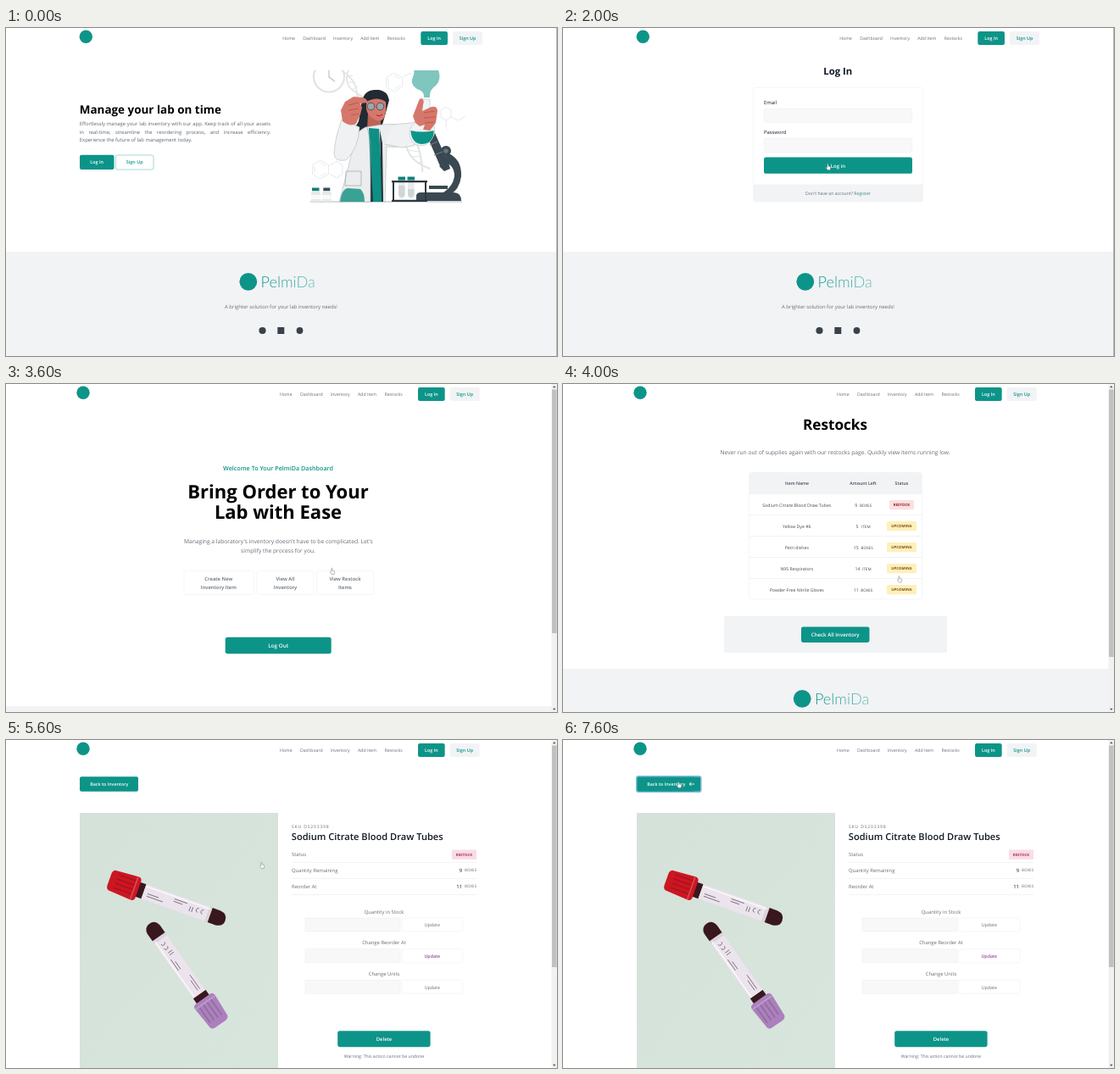
Animation of 650 by 387 pixels, one loop 8000 ms. Source, as an HTML page:

```html
<!DOCTYPE html>
<html lang="en">
<head>
<meta charset="utf-8">
<title>Lab inventory demo</title>
<style>
html, body { margin: 0; width: 100%; height: 100%; overflow: hidden; background: #fff; }
svg { display: block; width: 650px; height: 387px; }
text, .para {
  font-family: "Open Sans", "Noto Sans", sans-serif;
  text-rendering: geometricPrecision;
}
text { fill: #666d77; }
.para { font-size: 5.9px; line-height: 9.4px; color: #5f6670; white-space: nowrap; }
.para div:first-child { text-align: justify; text-align-last: justify; white-space: normal; }
.c { text-anchor: middle; }
.m { font-weight: 600; }
.b { font-weight: 700; fill: #000; }
.d { fill: #111827; }
.w { font-weight: 600; fill: #fff; }
.t { fill: #0d9488; }
.cell text { fill: #414853; font-size: 5.2px; }
.cell .u, .u { font-size: 4.6px; }
.cell .red { fill: #8f1f2f; font-size: 4.4px; font-weight: 700; }
.amber { fill: #80511a; font-size: 4.35px; font-weight: 700; }
.word { font: 300 18.2px Lato, sans-serif; fill: url(#fade); }
.btn { fill: #0d9488; }
.pale { fill: #f1f3f5; }
.box { fill: #fff; stroke: #f0f2f4; stroke-width: .7; }
.field { fill: #f8f8f9; stroke: #eceef0; stroke-width: .6; }
.rule { stroke: #eceef0; stroke-width: .7; fill: none; }
.ring { fill: none; stroke: #7fb9e2; stroke-width: 1.4; }
.thumb { fill: #c1c1c1; }

/* one loop: 1% = 80 ms */
.page, .on, #cursor { animation: 8s step-end infinite; }
#home { animation-name: home; }
#login { animation-name: login; }
#dash { animation-name: dash; }
#stock { animation-name: stock; }
#item { animation-name: item; }
#bar { animation-name: bar; }
#edge { animation-name: edge; }
#ring1 { animation-name: ring1; }
#ring2 { animation-name: ring2; }
#over1 { animation-name: over1; }
#under { animation-name: under; }
#over2 { animation-name: over2; }
#cursor { animation-name: move; }
#arrow { animation-name: arrow; }
#hand { animation-name: hand; }
#busy { animation-name: busy; }
@keyframes home { 0% { opacity: 1 } 15%, 100% { opacity: 0 } }
@keyframes login { 0% { opacity: 0 } 15% { opacity: 1 } 32.5%, 100% { opacity: 0 } }
@keyframes dash { 0% { opacity: 0 } 32.5% { opacity: 1 } 50%, 100% { opacity: 0 } }
@keyframes stock { 0% { opacity: 0 } 50% { opacity: 1 } 70%, 100% { opacity: 0 } }
@keyframes item { 0% { opacity: 0 } 70%, 100% { opacity: 1 } }
@keyframes bar { 0% { opacity: 0 } 32.5%, 100% { opacity: 1 } }
@keyframes edge { 0% { opacity: 1 } 32.5%, 100% { opacity: 0 } }
@keyframes ring1 { 0% { opacity: 0 } 8.75%, 100% { opacity: 1 } }
@keyframes ring2 { 0% { opacity: 0 } 26.25%, 100% { opacity: 1 } }
@keyframes over1 { 0% { opacity: 0 } 46.25%, 100% { opacity: 1 } }
@keyframes under { 0% { opacity: 0 } 62.5%, 100% { opacity: 1 } }
@keyframes over2 { 0% { opacity: 0 } 92.5%, 100% { opacity: 1 } }
@keyframes arrow {
  0% { opacity: 0 } 6.25% { opacity: 1 } 7.5% { opacity: 0 }
  16.25% { opacity: 1 } 21.25% { opacity: 0 } 38.75% { opacity: 1 } 43.75% { opacity: 0 }
  52.5% { opacity: 1 } 62.5% { opacity: 0 } 76.25% { opacity: 1 } 95%, 100% { opacity: 0 }
}
@keyframes hand {
  0% { opacity: 0 } 7.5% { opacity: 1 } 16.25% { opacity: 0 }
  21.25% { opacity: 1 } 32.5% { opacity: 0 } 43.75% { opacity: 1 } 52.5% { opacity: 0 }
  62.5% { opacity: 1 } 76.25% { opacity: 0 } 95%, 100% { opacity: 1 }
}
@keyframes busy { 0% { opacity: 0 } 32.5% { opacity: 1 } 38.75%, 100% { opacity: 0 } }
@keyframes move {
  0% { transform: translate(216px, 147px) }
  6.25% { transform: translate(216px, 147px); animation-timing-function: steps(3, start) }
  10% { transform: translate(102px, 157px) }
  16.25% { transform: translate(102px, 157px); animation-timing-function: steps(8, start) }
  26.25% { transform: translate(313px, 164px) }
  38.75% { transform: translate(313px, 164px); animation-timing-function: steps(7, start) }
  47.5% { transform: translate(397px, 230.5px) }
  52.5% { transform: translate(397px, 230.5px); animation-timing-function: steps(4, start) }
  57.5% { transform: translate(392px, 159px) }
  58.75% { transform: translate(402px, 145px); animation-timing-function: steps(5, start) }
  65% { transform: translate(302px, 148px) }
  76.25% { transform: translate(302px, 148px); animation-timing-function: steps(4, start) }
  81.25% { transform: translate(533px, 206px); animation-timing-function: steps(5, start) }
  87.5% { transform: translate(283px, 95px); animation-timing-function: steps(5, start) }
  93.75%, 100% { transform: translate(137px, 53px) }
}
</style>
</head>
<body>
<svg viewBox="0 0 650 387">
<defs>
  <linearGradient id="fade"><stop offset="0" stop-color="#0d9488"/><stop offset="1" stop-color="#6cc0b8"/></linearGradient>
  <linearGradient id="mint" x2="1" y2="1"><stop offset="0" stop-color="#d4e2d9"/><stop offset="1" stop-color="#d8e5dd"/></linearGradient>
  <clipPath id="photo"><rect x="87" y="86" width="234" height="301"/></clipPath>
  <clipPath id="scene"><rect x="355" y="50" width="190" height="156"/></clipPath>

  <g id="nav">
    <circle cx="94.3" cy="10.3" r="7.7" class="btn"/>
    <g font-size="5.2">
      <text x="326.2" y="14.4">Home</text><text x="350.2" y="14.4">Dashboard</text>
      <text x="386" y="14.4">Inventory</text><text x="418.3" y="14.4">Add Item</text>
      <text x="449.8" y="14.4">Restocks</text>
    </g>
    <rect x="489.3" y="4" width="31.7" height="16" rx="2.2" class="btn"/>
    <text x="505.2" y="14.3" font-size="5.4" class="c w">Log In</text>
    <rect x="527" y="4" width="35" height="16" rx="2.2" class="pale"/>
    <text x="544.5" y="14.3" font-size="5.4" class="c m t">Sign Up</text>
  </g>

  <g id="foot">
    <rect x="-10" y="264" width="680" height="130" class="pale"/>
    <circle cx="285.8" cy="299.3" r="10.4" class="btn"/>
    <text x="300.5" y="305.8" class="word">PelmiDa</text>
    <text x="324.5" y="331.2" font-size="5.94" class="c">A brighter solution for your lab inventory needs!</text>
    <g fill="#39424b">
      <circle cx="302.5" cy="357" r="4.1"/><rect x="320.3" y="353" width="8" height="8"/><circle cx="346.5" cy="357" r="3.9"/>
    </g>
  </g>

  <g id="up"><rect x="382" width="35" height="11.4" rx="1.6" y="-5.7" fill="#fdf0ba"/><text x="399.5" y="1.6" class="c amber">UPCOMING</text></g>

  <g id="entry">
    <rect x="353" y="210" width="112" height="16" class="field"/>
    <rect x="467" y="210" width="72" height="16" rx="1.5" class="box"/>
  </g>

  <g id="tube">
    <rect x="28" y="-9" width="117" height="18" rx="9" fill="#d9d4dc"/>
    <path d="M34-9h9v18h-9zM126-9h10q9 1 9 9t-9 9h-10z" fill="#39171f"/>
    <rect x="43" y="-9" width="79" height="18" fill="#ebe4ec"/>
    <path d="M48 4h20M48 1h14M80-4h16M80-1h11M101-2v6M104-2v6M111-3a2.5 2.5 0 1 0 0 5M117-3a2.5 2.5 0 1 0 0 5" stroke="#7d6f80" stroke-width=".9" fill="none"/>
    <path d="M44-6.8h80" stroke="#faf7fa" stroke-width="1.6"/>
    <path d="M3-12.5L32-14.5Q36-14 36-10V10Q36 14 32 14.5L3 12.5Q0 11 0 8V-8Q0-11 3-12.5z"/>
    <path d="M8-9h22M8-3.5h22M8 2h22M8 7.5h22" stroke="#000" stroke-opacity=".16" stroke-width="1.6"/>
    <path d="M31-14v28" stroke="#fff" stroke-opacity=".25" stroke-width="1.5"/>
  </g>

  <path id="hex" d="M0-11L9.5-5.5V5.5L0 11L-9.5 5.5V-5.5zM0-8L7-4M7 4L0 8M-7-4V4" fill="none" stroke="#e3e6e8" stroke-width=".8"/>
</defs>

<g class="page" id="home">
  <use href="#nav"/><use href="#foot"/>
  <text x="86.8" y="100.8" font-size="13.45" class="b">Manage your lab on time</text>
  <foreignObject x="86.8" y="109.3" width="225.4" height="32">
    <div xmlns="http://www.w3.org/1999/xhtml" class="para"><div>Effortlessly manage your lab inventory with our app. Keep track of all your assets<br/>in real-time, streamline the reordering process, and increase efficiency.</div><div>Experience the future of lab management today.</div></div>
  </foreignObject>
  <rect x="87" y="149.7" width="40.5" height="17.3" rx="2" class="btn"/>
  <text x="107.2" y="160.4" font-size="5.4" class="c w">Log In</text>
  <rect x="129.4" y="150" width="44.6" height="17" rx="2" fill="#fff" stroke="#7fc8c0" stroke-width=".7"/>
  <text x="151.7" y="160.4" font-size="5.4" class="c m t">Sign Up</text>
  <rect id="ring1" class="on ring" x="86.2" y="148.9" width="42.1" height="18.9" rx="2.6"/>

  <g clip-path="url(#scene)">
  <!-- backdrop shapes -->
  <g fill="none" stroke="#e0e3e5" stroke-width="1.6">
    <circle cx="381" cy="57.5" r="18" stroke-width="2.2"/><path d="M381 47V58L388 63" stroke="#cdd1d3"/>
    <path d="M396 50Q414 62 414 78T429 100M404 50Q398 66 410 74T426 86"/>
    <path d="M401 58l8-2M404 64l8 0M409 72l6-3M413 80l6 0" stroke-width="1"/>
    <path d="M446 128Q468 126 473 142T500 166M462 136Q484 126 488 146T491 170" stroke-width="2"/>
    <path d="M466 132l-1 8M473 134l9 6M474 144l13 2M479 152l10-1M486 159l5-1" stroke-width="1"/>
    <path d="M513 97l6-4 6 4v8l-6 4-6-4zM525 105l9 4 8-5M519 109v8" stroke-width=".8"/>
    <path d="M382 162l8-5 7 5v10l-7 5-8-5M469 57l9-4" stroke-width=".8"/>
  </g>
  <use href="#hex" x="371" y="167"/><use href="#hex" x="458" y="64"/>
  <path d="M359 205H538" stroke="#7b858b" stroke-width=".6"/>

  <!-- bottles -->
  <path d="M361 192h9l1 3v10h-11v-10zM374 192h8l2 3v10h-11v-10z" fill="#e6e8e9"/>
  <rect x="361" y="188.5" width="8.5" height="3.6" fill="#0d8177"/><rect x="374.3" y="188.5" width="8" height="3.6" fill="#39505a"/>
  <path d="M360 197h11v5h-11zM373 197h11v5h-11z" fill="#f8f9f9"/>

  <!-- microscope -->
  <g fill="#3a4851">
    <path d="M484 198q0-4 6-4h38q9 0 9 10h-53zM499 186h22v4h-22z"/>
    <path d="M520 147Q538 154 537 175Q535 191 523 197H511Q528 188 529 174Q529 162 516 157z"/>
    <path d="M497 128l9-4 16 36-9 5zM494 124l10-5 2 4-10 5zM511 163l11-5 2 8-7 3z"/>
    <circle cx="519" cy="145" r="6"/>
  </g>
  <circle cx="519" cy="145" r="2.8" fill="#667780"/><path d="M500 138l9-4M505 150l10-4" stroke="#718089"/>

  <!-- rack -->
  <g fill="#e9ebec"><rect x="463" y="176" width="7.5" height="25" rx="3.6"/><rect x="474" y="176" width="7.5" height="25" rx="3.6"/></g>
  <path d="M463 186h7.5v11q-3.7 6-7.5 0zM474 190h7.5v7q-3.7 6-7.5 0z" fill="#d0d5d7"/>
  <path d="M462.5 175.5h8.5v4h-8.5zM473.5 175.5h8.5v4h-8.5z" fill="#0d8177"/>
  <path d="M455 180h42v2.2h-42zM455 202.8h42v2.2h-42zM456 180h2v24h-2zM494 180h2v24h-2z" fill="#2d3942"/>

  <!-- scientist -->
  <path d="M420 86Q423 72 438 73Q450 74 452 85L448 100 444 114 426 127Q406 132 411 117Q418 111 417 100z" fill="#202b33"/>
  <path d="M427 101h15v20l-5 6-11-7z" fill="#bd6256"/>
  <path d="M425 87Q438 80 448 87Q449 100 446 106Q442 112 435 108Q426 104 425 95z" fill="#d6776b"/>
  <path d="M422 90Q426 79 437 81Q445 82 449 89Q454 76 440 73Q424 72 421 88z" fill="#202b33"/>
  <g fill="#9aa7ae" stroke="#35434c" stroke-width=".8"><circle cx="430.5" cy="92.5" r="4.3"/><circle cx="441.5" cy="92.5" r="4.3"/></g>
  <path d="M437 103q4 2 7-1" stroke="#862f32" stroke-width="1" fill="none"/>
  <g stroke="#b3b9bd" stroke-width=".6" stroke-linejoin="round">
    <path d="M424 117L443 114Q460 112 478 118L482 129Q470 143 449 140L447 205H393Q402 172 409 143Q409 124 424 117z" fill="#ebedee"/>
    <path d="M396 108L417 117Q416 142 401 156Q387 158 387 148Q388 130 396 108z" fill="#f0f1f2"/>
    <path d="M455 114L478 112 489 109 503 124Q488 140 467 141L447 137" fill="#f0f1f2"/>
  </g>
  <path d="M428 118l12 1 3 53-13 0z" fill="#0d8f84"/>
  <path d="M430 171l13 0 2 34h-15z" fill="#0d8f84"/>
  <path d="M430 150l3 55h-3zM441 120l3 16 1 69h-2z" fill="#24333c"/>
  <path d="M426 117l4 18 0 70M401 169h18v17h-19z" stroke="#8f999e" stroke-width=".6" fill="none"/>
  <path d="M394 205q2-15 9-16l15 1q5 4 5 15z" fill="#3aa294"/>
  <path d="M397 110l-2-13 5-10 10-6 11 1q6 2 5 6l-8 1 2 5-2 8-5 11q-7 4-16-3z" fill="#d6776b"/>
  <path d="M404 91l12-3M404 97l12-2M407 103l9-2" stroke="#a94e49" stroke-width=".7"/>

  <!-- flask -->
  <path d="M493 82q1-7-8-10-9-6-5-14 2-4 1-9h29q4 12-3 19-8 5-7 14z" fill="#7fc6bf"/>
  <path d="M487 84h13v25q8 5 5 17-5 13-16 13-13-2-13-15 0-10 11-15z" fill="#f0f4f4" stroke="#c3cccd" stroke-width=".7"/>
  <path d="M477.5 121q14 3 27 0 1 9-6 14-8 4-15 0-6-5-6-14z" fill="#0d9488"/>
  <path d="M483 112l-3-8 5-13q3-8 5-8 4 1 2 8l-1 7 11-5q7-1 7 5l-2 14-7 9-8-1 2-6-6 2z" fill="#d6776b"/>
  <path d="M493 100l13-2M493 106l13-1M494 112l11-1" stroke="#a94e49" stroke-width=".7"/>
  </g>
</g>

<g class="page" id="login">
  <use href="#nav"/><use href="#foot"/>
  <text x="324.3" y="55.2" font-size="11.35" class="c b d">Log In</text>
  <rect x="224.5" y="70.5" width="200" height="134.5" rx="2" class="box"/>
  <path d="M224.5 184.5h200v18.5q0 2-2 2h-196q-2 0-2-2z" class="pale"/>
  <g font-size="5.85"><text x="237" y="90" class="d">Email</text><text x="237" y="125" class="d">Password</text></g>
  <rect x="237.3" y="95.3" width="174.4" height="16.4" rx="1.5" class="field"/>
  <rect x="237.3" y="130.3" width="174.4" height="16.4" rx="1.5" class="field"/>
  <rect x="237" y="152.6" width="175" height="19.2" rx="2.6" class="btn"/>
  <text x="324.4" y="164.6" font-size="6" class="c w">Log in</text>
  <text x="324.5" y="196.9" font-size="5.18" class="c">Don't have an account? <tspan fill="#3f8580">Register</tspan></text>
  <rect id="ring2" class="on ring" x="236.2" y="151.8" width="176.6" height="20.8" rx="3"/>
</g>

<g class="page" id="dash">
  <use href="#nav" x="-3.3"/><use href="#foot" x="-3.6" y="116"/>
  <text x="321" y="102.2" font-size="7.2" class="c m t">Welcome To Your PelmiDa Dashboard</text>
  <g font-size="22"><text x="321" y="135.2" class="c b">Bring Order to Your</text><text x="321" y="158.7" class="c b">Lab with Ease</text></g>
  <g font-size="6.69">
    <text x="321.3" y="187.7" class="c">Managing a laboratory's inventory doesn't have to be complicated. Let's</text>
    <text x="321" y="198.7" class="c">simplify the process for you.</text>
  </g>
  <rect x="210" y="220.5" width="82.5" height="28" rx="2" class="box"/>
  <rect x="296" y="220.5" width="67" height="28" rx="2" class="box"/>
  <rect x="366.5" y="220.5" width="67" height="28" rx="2" class="box"/>
  <rect id="over1" class="on pale" x="367" y="221" width="66" height="27" rx="2"/>
  <g font-size="5.9">
    <text x="250.8" y="232.2" class="c m">Create New</text><text x="250.8" y="241.8" class="c m">Inventory Item</text>
    <text x="329.5" y="232.2" class="c m">View All</text><text x="329.5" y="241.8" class="c m">Inventory</text>
    <text x="400" y="232.2" class="c m">View Restock</text><text x="400" y="241.8" class="c m">Items</text>
  </g>
  <rect x="258.7" y="298.8" width="125" height="19.4" rx="2.6" class="btn"/>
  <text x="321.2" y="310.8" font-size="6.3" class="c w">Log Out</text>
</g>

<g class="page" id="stock">
  <use href="#nav" x="-3.3"/><use href="#foot" x="-3.6" y="72"/>
  <text x="321" y="54.2" font-size="17.15" class="c b">Restocks</text>
  <text x="321" y="82.8" font-size="6.7" class="c">Never run out of supplies again with our restocks page. Quickly view items running low.</text>
  <rect x="219.5" y="104.5" width="204" height="149.5" rx="3" class="box"/>
  <path d="M219.5 129.5V107.5q0-3 3-3h198q3 0 3 3v22z" class="pale"/>
  <path d="M219.5 129.5h204M219.5 154.5h204M219.5 179.5h204M219.5 204.5h204M219.5 229.5h204" class="rule"/>
  <g class="cell">
    <g class="m"><text x="276" y="119.1" class="c">Item Name</text><text x="354" y="119.1" class="c">Amount Left</text><text x="399.5" y="119.1" class="c">Status</text></g>
    <text x="275.8" y="144.6" class="c">Sodium Citrate Blood Draw Tubes</text>
    <text x="344.3" y="144.6">9</text><text x="350" y="144.6" class="u">BOXES</text>
    <rect x="385" y="136.9" width="29" height="11.4" rx="1.6" fill="#fbe0e0"/><text x="399.5" y="144.2" class="c red">RESTOCK</text>
    <text x="275.8" y="169.6" class="c">Yellow Dye #6</text>
    <text x="345.6" y="169.6">5</text><text x="352" y="169.6" class="u">ITEM</text>
    <text x="275.8" y="194.6" class="c">Petri dishes</text>
    <text x="342.8" y="194.6">15</text><text x="351.5" y="194.6" class="u">BOXES</text>
    <text x="275.8" y="219.6" class="c">N95 Respirators</text>
    <text x="344.5" y="219.6">14</text><text x="353" y="219.6" class="u">ITEM</text>
    <text x="275.8" y="244.6" class="c">Powder-Free Nitrile Gloves</text>
    <text x="342.8" y="244.6">11</text><text x="351.2" y="244.6" class="u">BOXES</text>
  </g>
  <use href="#up" y="167.6"/><use href="#up" y="192.6"/><use href="#up" y="217.6"/><use href="#up" y="242.6"/>
  <path id="under" class="on" d="M235 146.4h81.7" stroke="#414853" stroke-width=".8"/>
  <rect x="190" y="274" width="263" height="43" rx="2" class="pale"/>
  <rect x="281" y="286.4" width="80.5" height="18.6" rx="2.4" class="btn"/>
  <text x="321.2" y="298" font-size="6.1" class="c w">Check All Inventory</text>
</g>

<g class="page" id="item">
  <use href="#nav" x="-3.3"/>
  <rect x="87" y="43.2" width="69" height="17.6" rx="2" class="btn"/>
  <g id="over2" class="on">
    <rect x="87" y="43.2" width="75.6" height="17.6" rx="2" class="btn"/>
    <rect x="86.7" y="42.8" width="76.2" height="18.6" rx="2.4" class="ring"/>
    <path d="M155 52h-6m2.2-2.2L149 52l2.2 2.2" stroke="#fff" stroke-width=".9" fill="none"/>
  </g>
  <text x="99.3" y="54.1" font-size="5.3" class="w">Back to Inventory</text>
  <g clip-path="url(#photo)">
    <rect x="87" y="86" width="234" height="301" fill="url(#mint)"/>
    <use href="#tube" transform="translate(122 164.5) rotate(19.5)" fill="#cc1622"/>
    <use href="#tube" transform="translate(253 335) rotate(-125.3)" fill="#ab80bc"/>
  </g>
  <text x="337" y="104.4" font-size="5.1" letter-spacing=".8">SKU DS203398</text>
  <text x="336.8" y="118" font-size="11.1" class="m d">Sodium Citrate Blood Draw Tubes</text>
  <g font-size="5.9">
    <text x="337" y="137.2">Status</text><text x="337" y="156.1">Quantity Remaining</text><text x="337" y="175">Reorder At</text>
    <text x="446" y="204.9" class="c">Quantity in Stock</text><text x="446" y="241.4" class="c">Change Reorder At</text><text x="446" y="277.9" class="c">Change Units</text>
  </g>
  <path d="M337 144.5h218M337 163.5h218M337 182.5h218" class="rule"/>
  <rect x="526" y="129.5" width="29" height="11.4" fill="#f9dde4"/>
  <text x="540.5" y="136.8" font-size="4.4" font-weight="700" style="fill:#b02f6c" class="c">RESTOCK</text>
  <g font-size="5.9"><text x="534.8" y="156" class="d">9</text><text x="531.3" y="175" class="d">11</text></g>
  <text x="541" y="155.4" class="u">BOXES</text><text x="541" y="174.4" class="u">BOXES</text>
  <use href="#entry"/><use href="#entry" y="36.7"/><use href="#entry" y="73.2"/>
  <g font-size="5.3">
    <text x="502.8" y="220.3" class="c">Update</text><text x="502.8" y="257" class="c m" style="fill:#964b9d">Update</text><text x="502.8" y="293.5" class="c">Update</text>
  </g>
  <rect x="391.2" y="343.2" width="109.4" height="19" rx="2.4" class="btn"/>
  <text x="446" y="354.9" font-size="5.9" class="c w">Delete</text>
  <text x="446" y="374.9" font-size="5.2" class="c">Warning: This action cannot be undone</text>
</g>

<path id="edge" class="on" d="M649.5 0V387" stroke="#b4b7b9"/>
<g id="bar" class="on">
  <rect x="643.5" width="6.5" height="387" fill="#f1f1f1"/>
  <path d="M645 4.2l1.8-2.2 1.8 2.2zM645 382.8l1.8 2.2 1.8-2.2z" fill="#555"/>
  <rect class="thumb page" style="animation-name:dash" x="644" y="6.5" width="5.6" height="287.5"/>
  <rect class="thumb page" style="animation-name:stock" x="644" y="6.5" width="5.6" height="315.5"/>
  <rect class="thumb page" style="animation-name:item" x="644" y="6.5" width="5.6" height="261.5"/>
</g>

<g id="cursor">
  <path id="arrow" class="on" d="M-2.2-3.6V3.2L-.6 1.8.5 4.2 1.6 3.7.6 1.4H2.8z" fill="#fff" stroke="#444" stroke-width=".5"/>
  <path id="hand" class="on" d="M-1.2 .4V-3.3q.6-.9 1.2 0V-1l2 .4q.8.2.7 1L2.2 3.6H-.8L-2.6.9q.4-1 1.4-.5z" fill="#fff" stroke="#6b757b" stroke-width=".5"/>
  <circle id="busy" class="on" r="2.6" fill="none" stroke="#7d8790" stroke-width=".9" stroke-dasharray="2 .72"/>
</g>
</svg>
</body>
</html>
```
